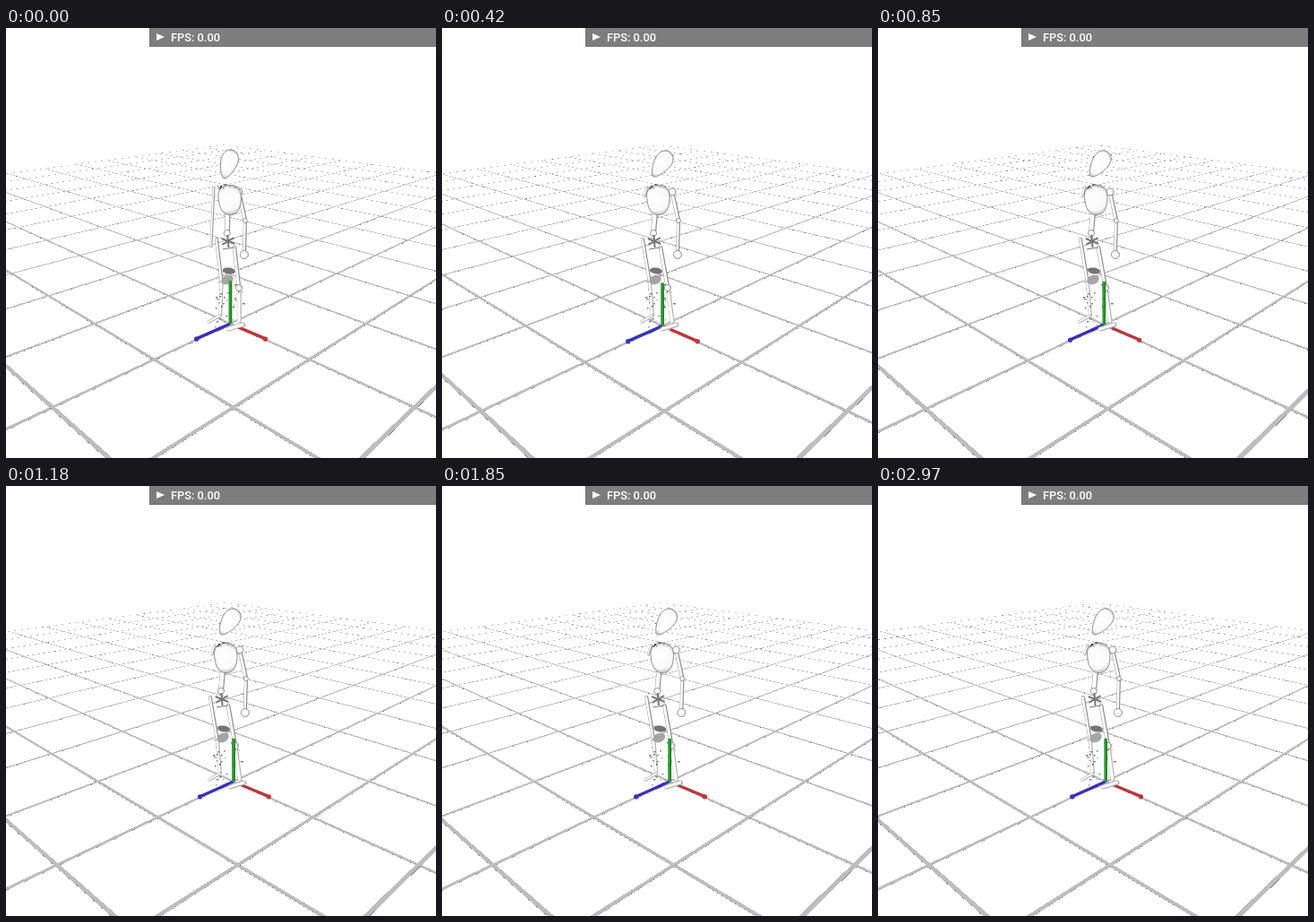
Write an HTML page with a canvas that moves like this. It is 480 px wide and 480 px high and loops after 3000 ms.

```html
<!DOCTYPE html>
<html>
<head>
<meta charset="utf-8">
<style>
html, body { margin: 0; width: 100%; height: 100%; overflow: hidden; background: #fff; }
canvas { position: absolute; left: 0; top: 0; }
#bar {
  position: absolute; left: 160px; top: 0; width: 320px; height: 21px;
  box-sizing: border-box; padding-left: 23px; background: #7d7d7d;
  border: solid #727272; border-width: 0 0 1px 1px;
  font: 500 12.8px/21px Roboto, sans-serif; color: #fff; white-space: pre;
}
#bar::before {
  content: ""; position: absolute; left: 7px; top: 6px;
  border: solid transparent; border-width: 4.5px 0 4.5px 9px; border-left-color: #fff;
}
</style>
</head>
<body>
<canvas id="stage" width="480" height="480"></canvas>
<div id="bar">FPS: 0.00</div>
<script>
const ctx = document.getElementById('stage').getContext('2d');
const LOOP = 3000, TURN = 420, HORIZON = 51, DROP = 279, NEAR = 0.1254, UNIT = 75.7;

// time, screen position of the world origin, sideways shift of the figure
const track = [
  [0, 250.4, 330, -2], [TURN, 246, 332.4, -5], [850, 252.3, 331, -3],
  [1180, 254, 329.8, -1], [LOOP, 254.2, 329.8, 0]
];

const joint = {
  shoulder: [262, 183], elbow: [269, 215], hand: [268, 253],
  ribs: [243, 207], waist: [241, 229], hipL: [229, 236], hipR: [249, 245],
  kneeL: [237, 284], kneeR: [257, 290], ankleL: [240, 321], ankleR: [262, 327],
  toeL: [228, 328], heelR: [251, 336], toeR: [267, 331]
};

const mix = (a, b, k) => a + (b - a) * k;
const random = n => Math.abs(Math.sin(n * 127.1 + 3) * 43758.5) % 1;
let cam, turn, shift;

function sample(t) {
  const i = track.findIndex(k => k[0] > t), a = track[i - 1], b = track[i];
  return a.map((v, n) => mix(v, b[n], (t - a[0]) / (b[0] - a[0])));
}

function project(u, v) {
  const d = cam.depth - NEAR * (u + v);
  return [240 + (cam.side + UNIT * (u - v)) / d, HORIZON + DROP / d];
}

// Hard-edged strip between two lines: thin strips break into dashes.
function strip([p, q], [r, s], color) {
  const at = (a, b, x) => a[1] + (b[1] - a[1]) * (x - a[0]) / (b[0] - a[0]);
  const x0 = Math.max(0, Math.ceil(Math.min(p[0], q[0])));
  const x1 = Math.min(480, Math.max(p[0], q[0]));
  ctx.fillStyle = color;
  for (let x = x0; x < x1; x++) {
    const ya = at(p, q, x + .5), yb = at(r, s, x + .5);
    const top = Math.ceil(Math.min(ya, yb) - .5), h = Math.ceil(Math.max(ya, yb) - .5) - top;
    if (h > 0) ctx.fillRect(x, top, 1, h);
  }
}

function drawGrid() {
  for (let c = -10; c <= 10; c++) {
    const end = Math.min(10, 6 - c);
    for (const flip of [false, true]) {
      const at = (along, off) => flip ? project(c + off, along) : project(along, c + off);
      const edge = off => [at(-10, off), at(end, off)];
      strip(edge(-.017), edge(.017), '#bdbdbd');
      strip(edge(.017), edge(.018), '#707070');
    }
  }
}

function line([x1, y1], [x2, y2], w, color) {
  ctx.strokeStyle = color;
  ctx.lineWidth = w;
  ctx.beginPath();
  ctx.moveTo(x1, y1);
  ctx.lineTo(x2, y2);
  ctx.stroke();
}

// At first the trunk bows sideways, straightening as the figure turns.
function place([x, y], bow = 8) {
  return [x + shift + bow * (1 - turn) * Math.sin(Math.PI * (y - 150) / 180), y];
}

function bone(a, b, w, edge = '#8c8c8c', bow) {
  const p = place(a, bow), q = place(b, bow);
  ctx.lineCap = 'round';
  line(p, q, w, edge);
  line([p[0] - .4, p[1]], [q[0] - .4, q[1]], w - 1.6, '#fff');
  ctx.lineCap = 'butt';
}

function glow(r) {
  const g = ctx.createRadialGradient(-r * .25, -r * .15, 0, 0, 0, r);
  g.addColorStop(0, '#fff');
  g.addColorStop(.7, '#fafafa');
  g.addColorStop(1, '#a8a8a8');
  return g;
}

// Closed oval: taper narrows its foot, power below 1 squares its corners.
function egg(center, w, h, tilt, taper, power, fill, bow) {
  const bend = v => Math.sign(v) * Math.abs(v) ** power;
  ctx.save();
  ctx.translate(...place(center, bow));
  ctx.rotate(tilt);
  ctx.beginPath();
  for (let a = 0; a < 6.28; a += .1) {
    const c = bend(Math.cos(a));
    ctx.lineTo(w * bend(Math.sin(a)) * (1 + taper * c), -h * c);
  }
  ctx.closePath();
  ctx.fillStyle = fill || glow(Math.max(w, h) * 1.1);
  ctx.fill();
  if (!fill) {
    ctx.strokeStyle = '#858585';
    ctx.lineWidth = .9;
    ctx.stroke();
  }
  ctx.restore();
}

const ball = (p, r, bow) => egg(p, r, r, 0, 0, 1, null, bow);

// Scattered specks of shadow around a point
function flecks(count, seed, [x, y], w, h) {
  for (let i = 0; i < count; i++) {
    const n = seed + i * 4;
    const p = place([x + (random(n) - .5) * w, y + (random(n + 1) - .5) * h]);
    const grey = 90 + 110 * random(n + 2);
    ctx.fillStyle = `rgb(${grey},${grey},${grey})`;
    ctx.fillRect(Math.round(p[0]), Math.round(p[1]), 1 + 2 * random(n + 3), 1.5);
  }
}

function drawAxes() {
  const [x, y] = project(0, 0);
  const ground = (u, v, color) => {
    const start = project(u * .22, v * .22), tip = project(u, v);
    tip[1] -= 1;
    line(start, tip, 3.4, color);
    ctx.fillStyle = color;
    ctx.beginPath();
    ctx.arc(tip[0] - Math.sign(tip[0] - x) * 2, tip[1] - .5, 2.6, 0, 7);
    ctx.fill();
  };
  line([x, y], project(0, .2), 3.4, '#3a32b8');
  ground(.5, 0, '#bc3840');
  ground(0, .5, '#3a32b8');
  line([x, y], [x, y - 48], 3.6, '#2a9a2e');
  line([x + 1.3, y], [x + 1.3, y - 46], 1, '#1d7422');
}

function drawLegs() {
  const j = joint, pale = '#b0b0b0';
  bone(j.hipL, j.kneeL, 4);
  bone(j.hipR, j.kneeR, 4.5);
  bone(j.kneeL, j.ankleL, 4, pale);
  bone(j.kneeR, j.ankleR, 5, pale);
  bone(j.ankleL, j.toeL, 3.5, pale);
  line(place([236, 247]), place(j.hipR), 1.2, '#777');
  egg([243, 281], 7, 5, -.4, 0, 1, '#a5a5a5');
  egg([244, 271], 7, 3.5, .15, 0, 1, '#757575');
  ball(j.kneeR, 3.5);
  flecks(34, 1, [248, 309], 34, 54);
}

function drawTrunk() {
  const j = joint;
  // left arm, hidden behind the chest once turned
  bone([234, 178], [231, mix(244, 188, turn)], 3, '#a0a0a0', 0);
  bone(j.shoulder, j.elbow, 4.5, undefined, 0);
  bone(j.elbow, j.hand, 4, undefined, 0);
  bone(j.ribs, j.waist, 6);
  ball(j.waist, 3.5);
  for (let i = 0; i < 3; i++) {
    const a = .45 + i * 1.05, dx = 8 * Math.cos(a), dy = 7 * Math.sin(a);
    line(place([242 - dx, 238 - dy]), place([242 + dx, 238 + dy]), 2, '#777');
  }
  ball(j.shoulder, 4, 0);
  ball(j.elbow, 2.4, 0);
  ball(j.hand, 4.5, 0);
  egg([246.5, 192], 12.5, 16.5, -.05, .13, .8);
  egg([250, 152], 9, 16.5, mix(.3, .6, turn), .35, 1);
  flecks(9, 200, [244, 176], 24, 5);
  ctx.fillStyle = '#3a3a9c';
  ctx.fillRect(...place([238, 176]).map(Math.round), 2, 2);
}

function frame() {
  const t = performance.now() % LOOP;
  const [, x, y, dx] = sample(t), depth = DROP / (y - HORIZON);
  cam = { depth, side: (x - 240) * depth };
  turn = Math.min(1, t / TURN);
  shift = dx;
  ctx.fillStyle = '#fff';
  ctx.fillRect(0, 0, 480, 480);
  drawGrid();
  drawLegs();
  drawAxes();
  bone(joint.heelR, joint.toeR, 5, '#a5a5a5');
  drawTrunk();
  requestAnimationFrame(frame);
}
frame();
</script>
</body>
</html>
```
